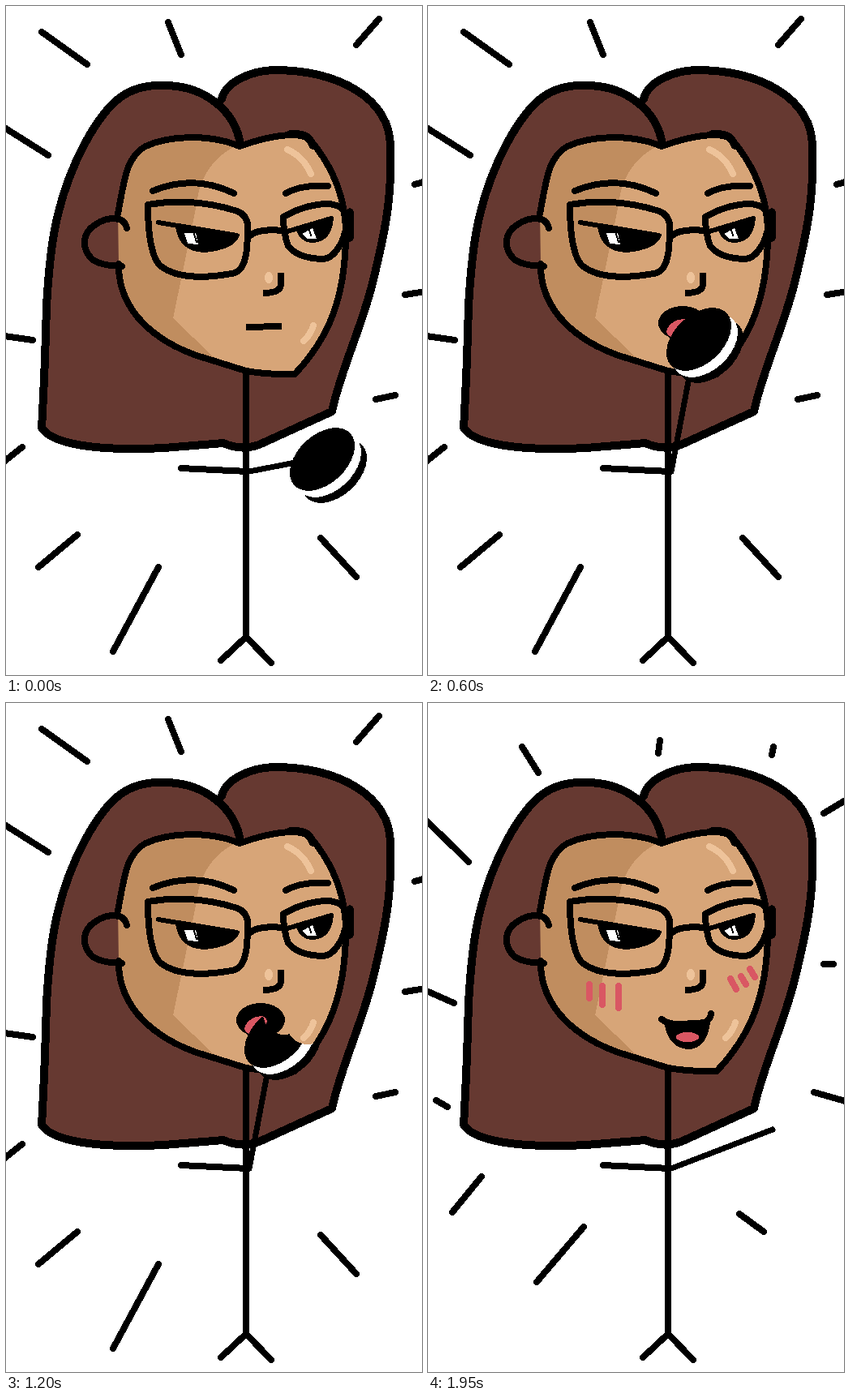
An HTML page that plays this animation: 513 px wide and 825 px high, repeating every 2250 ms.

```html
<!DOCTYPE html>
<html lang="en">
<head>
<meta charset="utf-8">
<title>Cookie</title>
<style>
html, body { margin: 0; width: 100%; height: 100%; overflow: hidden; background: #fff; }
svg { display: block; width: 513px; height: 825px; }
path, line { stroke: #000; stroke-width: 8; fill: none; stroke-linecap: round; stroke-linejoin: round; }
.flat { stroke: none; }
.bold { stroke-width: 9.5; }
.butt { stroke-linecap: butt; }
.shine { stroke: #eec39a; }
.blush { stroke: #d95763; }
.hair { fill: #663931; }
.skin { fill: #d7a578; }
.shade { fill: #c08d5f; }
.tongue { fill: #d95763; }
.white { fill: #fff; }
.black { fill: #000; }
</style>
</head>
<body>
<svg viewBox="0 0 513 825" shape-rendering="crispEdges">
  <defs>
    <path id="face" d="M139 318C138 380 190 415 235 431L296 450Q325 455 356 454C398 410 418 360 419 285C420 235 400 195 376 166C362 152 318 162 288 173C250 157 200 160 172 173C148 186 146 215 138 256"/>
    <path id="ear" d="M149 274C146 258 125 260 111 269C92 281 94 300 106 312Q115 320 143 321"/>
    <clipPath id="skin"><use href="#face"/></clipPath>
  </defs>

  <path id="rays"/>

  <path class="hair" style="stroke-width:10" d="M289 172C284 130 245 98 195 98C150 96 125 118 97 170C60 240 54 300 50 370Q48 450 44 520C60 546 140 548 195 545L268 539Q290 549 312 541L402 500C412 450 442 390 456 325C468 275 476 235 474 175C475 114 410 79 330 79C300 80 270 95 266 115"/>
  <use href="#ear" class="shade"/>
  <path class="flat shade" d="M139 318V256L149 274V320Z"/>
  <g clip-path="url(#skin)">
    <rect class="shade" x="90" y="140" width="350" height="330"/>
    <path class="flat skin" d="M284 172Q240 195 235 245L206 385L255 432L300 470H460V130H300Z"/>
  </g>
  <path class="shine" d="M347 177Q367 186 376 207M379 394Q376 405 367 413"/>
  <ellipse cx="324" cy="335" rx="5" ry="7" fill="#eec39a"/>
  <use href="#face" class="line"/>
  <use href="#ear" class="line"/>
  <path class="bold" d="M350 158Q374 156 378 172M424 254V286"/>

  <g id="brows"><path d="M181 228Q232 207 281 231M345 231Q364 220 397 222"/></g>
  <path id="glasses" d="M175 245C215 238 255 243 285 253Q298 258 298 272C298 300 297 328 278 330C240 337 205 335 188 318Q175 300 175 245M342 260Q370 244 398 244Q422 246 420 268C418 290 405 312 390 312Q360 311 348 296Q342 280 342 260M300 284Q310 274 341 277"/>
  <path style="stroke-width:6" d="M188 267L285 283M347 278L401 262"/>
  <path class="flat black" d="M209 272L288 282Q284 300 245 304Q213 303 209 272M358 276L404 261Q402 291 378 292Q362 291 358 276"/>
  <path class="flat white" d="M220 280L234 280L237 294L224 293ZM365 281L378 274L383 287L372 287Z"/>
  <path style="stroke-width:2" d="M232 281L235 291M374 276L376 283"/>
  <path class="butt" d="M339 329V344Q338 354 317 354"/>

  <g id="mouth"></g>
  <path d="M296 453V778L265 807M296 778L327 810M216 570L298 574"/>
  <line id="arm" x1="300" y1="574" style="stroke-width:7"/>
  <g id="cookie"></g>
</svg>
<script>
const STEP = 150, LOOP = 2250, LAST = 13;
const $ = id => document.getElementById(id);

const rays = [
  'M44 32L100 72M200 20L216 60M460 16L432 48M-2 150L52 184M504 220L518 216M492 356L518 352' +
  'M-2 407L33 412M456 485L480 480M20 544L-4 563M88 652L40 692M188 692L132 796M388 656L432 704',
  'M116 54L136 86M286 46L284 62M426 54L424 64M-4 143L50 196M488 136L518 118M488 322L500 322' +
  'M-4 354L32 370M10 490L24 498M476 480L518 492M66 584L30 628M192 646L134 714M384 630L414 652'
];

const smile = '<path d="M288 390Q297 397 318 397Q348 398 349 383"/>';
const mouths = {
  shut: '<path class="butt" d="M296 396L340 395"/>',
  open: '<ellipse cx="314" cy="391" rx="30" ry="21"/>' +
    '<ellipse class="tongue" cx="308" cy="397" rx="15" ry="9" transform="rotate(-30 308 397)"/>',
  smile,
  grin: smile + '<path class="black" d="M296 397Q300 420 319 423Q340 424 344 394Z"/>' +
    '<ellipse class="tongue" cx="320" cy="412" rx="14" ry="6"/>' +
    '<path class="blush" d="M199 347V364M215 349V372M235 349V376M373 340L380 353M386 337L392 347M397 328L403 338"/>'
};

// Where the hand and the cookie are at key steps; steps between are blended.
const eating = [322, 458, 334, 411];
const keys = {
  0: [357, 563, 390, 559], 2: [374, 508, 397, 465], 4: eating, 7: [357, 477, 366, 428],
  8: eating, 9: [375, 473, 370, 424], 10: eating, 11: [388, 459], 13: [425, 526]
};
function pose(i) {
  const steps = Object.keys(keys).map(Number);
  const a = steps.filter(s => s <= i).pop(), b = steps.find(s => s >= i);
  const k = a === b ? 0 : (i - a) / (b - a);
  return keys[a].map((v, j) => v + (keys[b][j] - v) * k);
}

// Three stacked discs, with round bites cut out of the stack.
const bites = [[9, -28], [38, -16], [-6, -22], [36, -4], [-46, 14]];
function cookie(count) {
  const holes = bites.slice(0, count).map(([x, y]) => `<circle cx="${x}" cy="${y}" r="26"/>`).join('');
  const disc = (shift, color) =>
    `<ellipse rx="47" ry="30" fill="${color}" transform="translate(${shift} ${shift}) rotate(-43)"/>`;
  return '<mask id="bitten" maskUnits="userSpaceOnUse" x="-80" y="-80" width="160" height="160">' +
    `<rect x="-80" y="-80" width="160" height="160" fill="#fff"/>${holes}</mask>` +
    `<g mask="url(#bitten)">${disc(15, '#000')}${disc(8, '#fff')}${disc(0, '#000')}</g>`;
}

function show(i) {
  const [hx, hy, cx, cy] = pose(i);
  const mouth = i === LAST ? 'grin' : i > 10 ? 'smile' : keys[i] === eating ? 'open' : 'shut';
  $('rays').setAttribute('d', rays[i % 2]);
  $('mouth').innerHTML = mouths[mouth];
  $('arm').setAttribute('x2', hx);
  $('arm').setAttribute('y2', hy);
  $('cookie').innerHTML = i > 10 ? '' : cookie(i < 5 ? 0 : i < 9 ? 2 : 5);
  $('cookie').setAttribute('transform', `translate(${cx || 0} ${cy || 0})`);
}

let shown = -1;
function tick() {
  const i = Math.min(LAST, Math.floor(performance.now() % LOOP / STEP));
  if (i !== shown) show(shown = i);
  requestAnimationFrame(tick);
}
tick();
</script>
</body>
</html>
```
